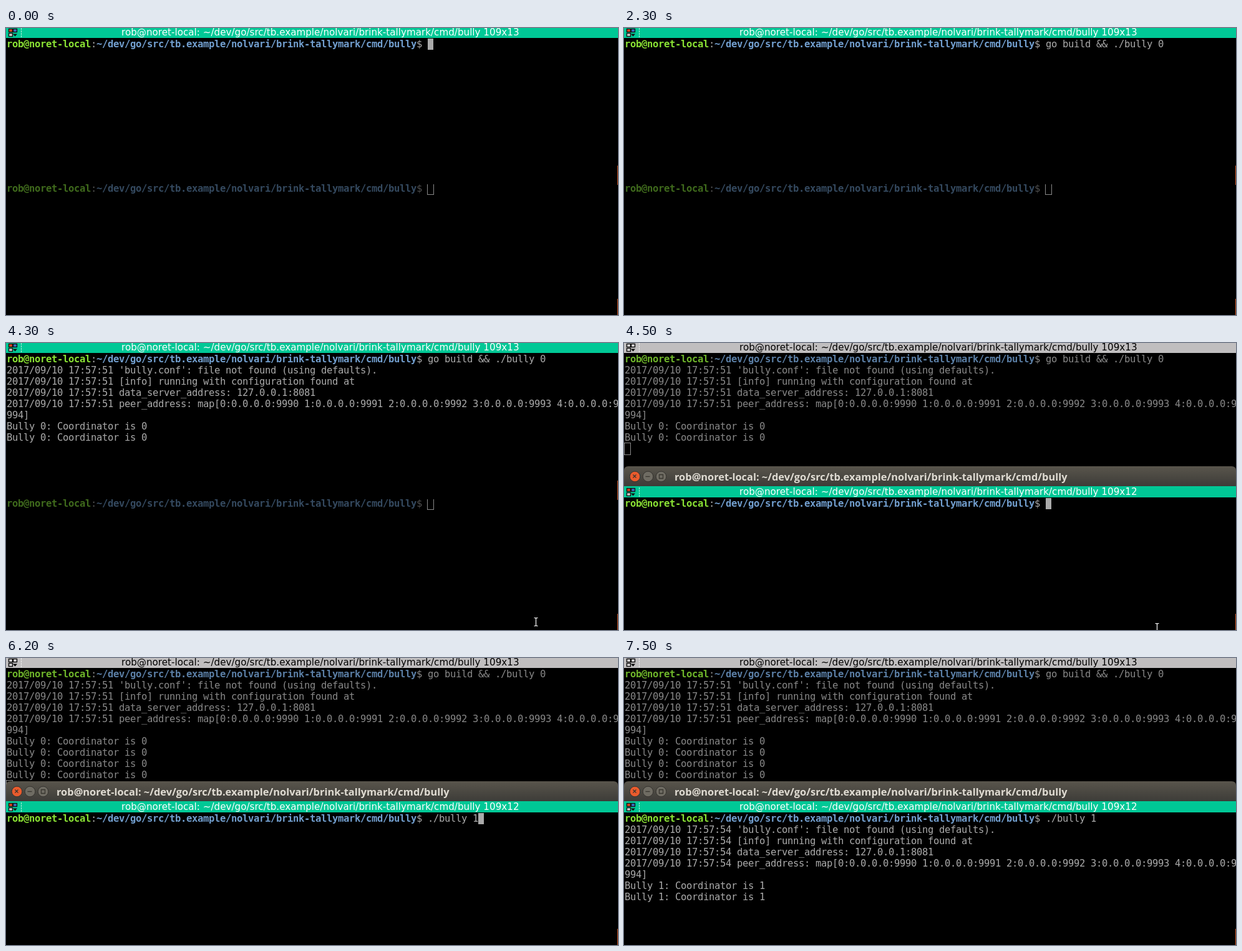
Recreate the animation shown at these times as an HTML page. Size 981 by 461 pixels, loop 8 s.

```html
<!DOCTYPE html>
<html lang="en">
<head>
<meta charset="utf-8">
<title>Terminal session</title>
<style>
  html, body { margin: 0; width: 100%; height: 100%; overflow: hidden; background: #000; }
  svg { display: block; width: 981px; height: 461px; }
  text { white-space: pre; }
  .mono { font: 15.5px "DejaVu Sans Mono", monospace; fill: var(--text); }
  .user { font-weight: bold; fill: var(--user); }
  .path { font-weight: bold; fill: var(--path); }
  .bar { font: 15.16px "DejaVu Sans", sans-serif; fill: var(--barText); }
  .caption { font: bold 16.4px "Open Sans", sans-serif; fill: #dfdbd2; }
  .active { --text: #aaa; --user: #8ae234; --path: #729fcf; --bar: #00c896; --barText: #fff;
            --red: #d9421f; --blue: #3a6fc0; --grey: #c8c8c8; --edge: #111; }
  .inactive { --text: #888; --user: #6eb52a; --path: #5b7fa6; --bar: #c0bebf; --barText: #000;
              --red: #d4d2d3; --blue: #d4d2d3; --grey: #d4d2d3; --edge: #000; }
  .faint { --text: #505050; --user: #3f6a1c; --path: #34495f; }
</style>
</head>
<body>
<svg id="stage" viewBox="0 0 981 461">
  <defs>
    <linearGradient id="chrome" x2="0" y2="1">
      <stop offset="0" stop-color="#59554c"/>
      <stop offset="1" stop-color="#3d3c38"/>
    </linearGradient>
  </defs>
  <rect width="981" height="461"/>
</svg>
<script>
const LOOP = 8000, FOCUS = 4500, CELL = 9, ROW = 18;
const HOST = 'rob@noret-local';
const DIR = '~/dev/go/src/tb.example/nolvari/brink-tallymark/cmd/bully';
const stage = document.getElementById('stage');
const timed = [];

function add(parent, tag, attrs = {}, content) {
  const el = document.createElementNS('http://www.w3.org/2000/svg', tag);
  for (const key in attrs) el.setAttribute(key, attrs[key]);
  if (content !== undefined) el.textContent = content;
  return parent.appendChild(el);
}

function during(from, to, el) {
  timed.push({ from, to, el });
  return el;
}

// Keep characters on the terminal's cell grid
function cellSpacing() {
  const sample = add(stage, 'text', { class: 'mono' }, '0'.repeat(100));
  const advance = sample.getComputedTextLength() / 100;
  sample.remove();
  return CELL - advance;
}
const spacing = cellSpacing();

const rowTop = row => 17 + ROW * row;

function line(pane, row, from, content) {
  const el = add(pane, 'text', {
    class: 'mono', x: 1, y: rowTop(row) + 14, 'letter-spacing': spacing
  }, content);
  return during(from, LOOP, el);
}

function prompt(pane, command, typedAt) {
  const el = line(pane, 0, 0);
  add(el, 'tspan', { class: 'user' }, HOST);
  add(el, 'tspan', {}, ':');
  add(el, 'tspan', { class: 'path' }, DIR);
  add(el, 'tspan', {}, '$ ');
  during(typedAt, LOOP, add(el, 'tspan', {}, command));
}

function startup(pane, clock, from, id) {
  const stamp = '2017/09/10 17:57:' + clock;
  const peers = [0, 1, 2, 3, 4].map(n => `${n}:0.0.0.0:999${n}`).join(' ');
  const address = `${stamp} peer_address: map[${peers}]`;
  [
    `${stamp} 'bully.conf': file not found (using defaults).`,
    `${stamp} [info] running with configuration found at`,
    `${stamp} data_server_address: 127.0.0.1:8081`,
    address.slice(0, 109),
    address.slice(109)
  ].forEach((content, i) => line(pane, i + 1, from, content));
  return (row, at) => line(pane, row, at, `Bully ${id}: Coordinator is ${id}`);
}

function block(pane, from, to, col, row) {
  during(from, to, add(pane, 'rect', {
    x: 1 + CELL * col, y: rowTop(row), width: CELL, height: ROW, fill: '#aaa'
  }));
}

function hollow(pane, from, to, col, row) {
  during(from, to, add(pane, 'rect', {
    x: CELL * col + 0.5, y: rowTop(row) - 0.5, width: CELL + 1, height: ROW + 1,
    fill: 'none', stroke: '#888'
  }));
}

function titleBar(pane, size) {
  const bar = add(pane, 'g');
  add(bar, 'rect', { y: -2, width: 981, height: 18, fill: 'var(--bar)' });
  [[4, 1, '--red'], [11, 1, '--blue'], [4, 8, '--grey']].forEach(([x, y, tone]) =>
    add(bar, 'rect', {
      x: x + 0.5, y: y + 0.5, width: 6, height: 5, fill: `var(${tone})`,
      stroke: 'var(--edge)', 'stroke-width': 1.3
    }));
  add(bar, 'path', { d: 'M11 9.5h7l-3.5 4z', fill: 'var(--edge)' });
  add(bar, 'path', { d: 'M24.5 0V15', stroke: '#fff', 'stroke-dasharray': '3 1', opacity: 0.7 });
  add(bar, 'text', { class: 'bar', x: 185, y: 12 }, `${HOST}: ${DIR} ${size}`);
  return bar;
}

function windowChrome() {
  const chrome = during(FOCUS, LOOP, add(stage, 'g'));
  add(chrome, 'path', { d: 'M0 230V205Q0 198 7 198H974Q981 198 981 205V230Z', fill: 'url(#chrome)' });
  const marks = ['M14.5 211.5l5 5m0-5l-5 5', 'M34.5 214.5h7', 'M56.5 211.5h6v6h-6z'];
  marks.forEach((d, i) => {
    add(chrome, 'circle', {
      cx: 17.5 + 21 * i, cy: 214.5, r: 8.3, fill: i ? '#6f6c63' : '#e95b2d', stroke: '#35332f'
    });
    add(chrome, 'path', { d, fill: 'none', stroke: '#37352f', 'stroke-width': 1.3 });
  });
  add(chrome, 'text', { class: 'caption', x: 81, y: 220.5 }, `${HOST}: ${DIR}`);
}

// Upper pane
const upper = add(stage, 'g');
titleBar(upper, '109x13');
prompt(upper, 'go build && ./bully 0', 600);
const reportUpper = startup(upper, 51, 3200, 0);
for (let i = 0; i < 4; i++) reportUpper(6 + i, 3200 + 1000 * i);
block(upper, 0, 200, 75, 0);
block(upper, 600, 1400, 96, 0);
block(upper, 1400, 2300, 0, 1);
block(upper, 3300, 4200, 0, 7);
hollow(upper, FOCUS, 5200, 0, 8);
hollow(upper, 5200, 6200, 0, 9);
hollow(upper, 6200, 7200, 0, 10);

windowChrome();

// Lower pane
const lower = add(stage, 'g', { transform: 'translate(0 232)' });
during(FOCUS, LOOP, titleBar(lower, '109x12'));
prompt(lower, './bully 1', 5800);
const reportLower = startup(lower, 54, 6500, 1);
reportLower(6, 6500);
reportLower(7, 7500);
hollow(lower, 0, FOCUS, 75, 0);
block(lower, FOCUS, 5400, 75, 0);
block(lower, 5800, 6500, 84, 0);
block(lower, 6500, 7400, 0, 7);
during(0, FOCUS, add(lower, 'rect', { y: 10, width: 981, height: 9 }));

// Slivers of the window behind
const sliver = (y, height) => add(stage, 'rect', { x: 980, y, width: 1, height, fill: '#d0592a' });
during(0, FOCUS, sliver(221, 31));
sliver(435, 26);

const pointer = during(4000, 4600, add(stage, 'path', {
  d: 'M-3 -6.5H-1L0 -5.5L1 -6.5H3M0 -5.5V5.5M-3 6.5H-1L0 5.5L1 6.5H3',
  fill: 'none', stroke: '#fff', 'stroke-width': 1.2
}));
const pointerPath = [[4000, 846.5, 459], [4100, 847.5, 454], [4200, 848.5, 450], [4300, 849.5, 448], [4500, 854.5, 457]];

function render(t) {
  for (const { from, to, el } of timed) {
    el.style.display = t >= from && t < to ? '' : 'none';
  }
  upper.setAttribute('class', t < FOCUS ? 'active' : 'inactive');
  lower.setAttribute('class', t < FOCUS ? 'faint' : 'active');
  const [, x, y] = pointerPath.filter(([at]) => at <= t).pop() || pointerPath[0];
  pointer.setAttribute('transform', `translate(${x} ${y})`);
}

const start = performance.now();
function tick() {
  render((performance.now() - start) % LOOP);
  requestAnimationFrame(tick);
}
tick();
</script>
</body>
</html>
```
